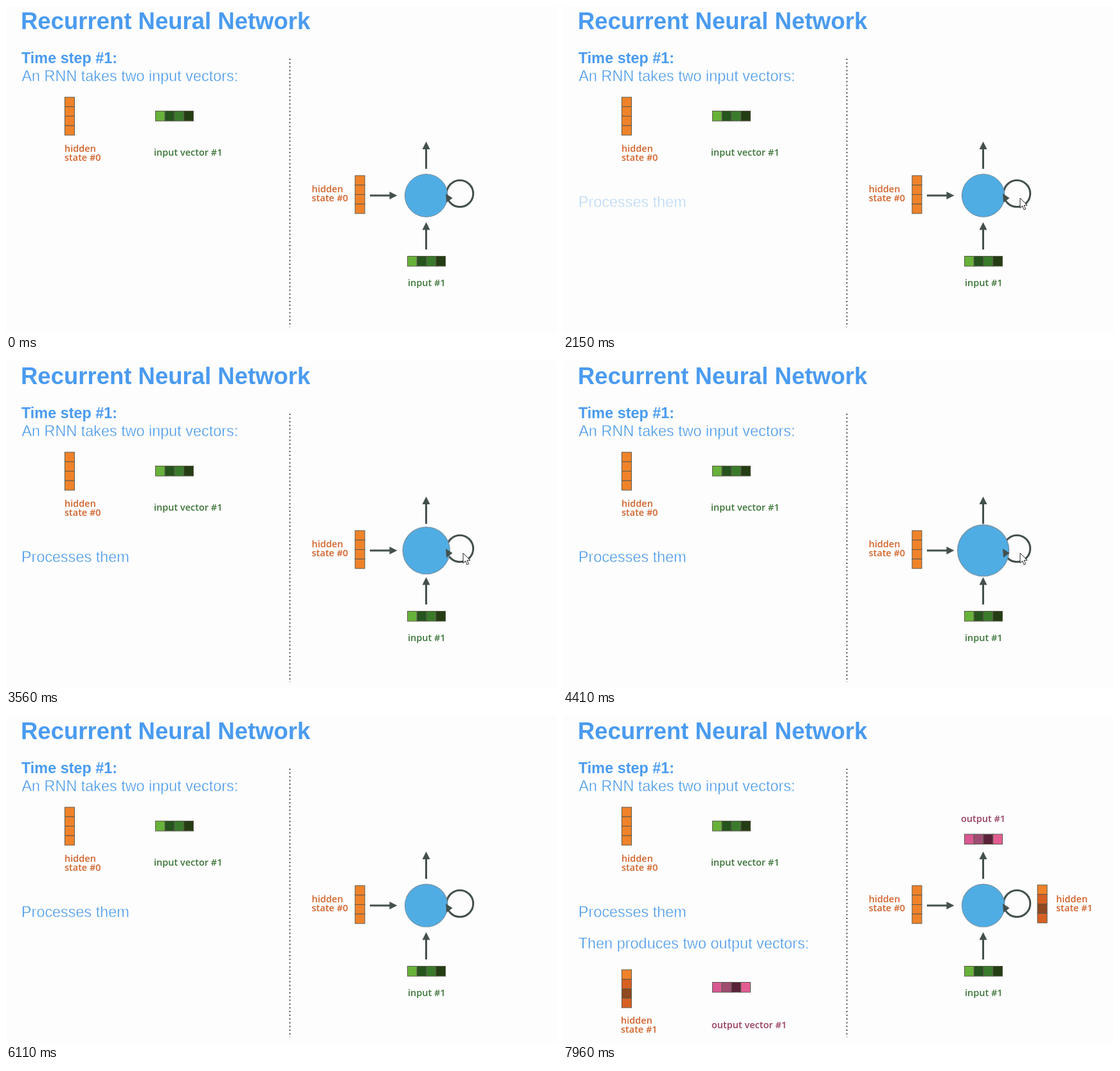
An HTML page that plays this animation: 857x509 px, repeating every 8000 ms.

```html
<!DOCTYPE html>
<html lang="en">
<head>
<meta charset="utf-8">
<title>Recurrent Neural Network</title>
<style>
  html, body { margin: 0; width: 100%; height: 100%; overflow: hidden; background: #fdfdfd; }
  svg { display: block; width: 857px; height: 509px; }
  .title, .step, .line { font-family: "Liberation Sans", Arial, sans-serif; fill: #4a9bf0; }
  .title { font-size: 36.5px; font-weight: 700; }
  .step { font-size: 23.4px; font-weight: 700; }
  /* a background-coloured outline thins the strokes to a light weight */
  .line { font-size: 23.4px; fill: #4396ea; stroke: #fdfdfd; stroke-width: .5px; }
  .label { font: 600 14.5px "Open Sans", "Noto Sans", sans-serif; }
  #ball { transform-box: fill-box; transform-origin: center; }
</style>
</head>
<body>
<svg id="stage" viewBox="0 0 857 509"></svg>
<script>
const LOOP = 8000;
const INK = '#43504d';
const ORANGE = '#d2632b', GREEN = '#3c7538', PLUM = '#98405f';
const HIDDEN_0 = ['#f0832a', '#f0832a', '#f0832a', '#f0832a'];
const HIDDEN_1 = ['#f0832a', '#d85f22', '#8f481f', '#d85f22'];
const INPUT = ['#67b23a', '#25541d', '#3a7b2b', '#243d13'];
const OUTPUT = ['#d95893', '#a04c72', '#5a2139', '#e35d93'];
const CELL = 14.75;

const text = (kind, x, y, words, color) =>
  `<text class="${kind}" x="${x}" y="${y}"${color ? ` style="fill:${color}"` : ''}>${words}</text>`;

const label = (x, y, words, color) => text('label', x, y, words, color);

const stateLabel = (x, y, n) =>
  label(x, y, 'hidden', ORANGE) + label(x, y + 14.3, `state #${n}`, ORANGE);

const vector = (x, y, colors, upright) => colors.map((color, i) => {
  const [dx, dy, w, h] = upright ? [0, i * CELL, 15, CELL] : [i * CELL, 0, CELL, 15.5];
  return `<rect x="${x + dx}" y="${y + dy}" width="${w}" height="${h}" fill="${color}" stroke="#5c5a4c"/>`;
}).join('');

const arrow = (x, y, angle) =>
  `<g transform="translate(${x} ${y}) rotate(${angle})" fill="${INK}">
     <path d="M0 0L-12 -6V6Z"/><rect x="-42.5" y="-1.5" width="32" height="3"/></g>`;

const group = (id, ...parts) => `<g id="${id}">${parts.join('')}</g>`;

document.getElementById('stage').innerHTML = [
  text('title', 23, 36, 'Recurrent Neural Network'),
  text('step', 24, 89, 'Time step #1:'),
  text('line', 24.5, 117, 'An RNN takes two input vectors:'),
  vector(91.5, 142, HIDDEN_0, true),
  stateLabel(91, 227, 0),
  vector(232.5, 163.5, INPUT),
  label(230, 233, 'input vector #1', GREEN),
  '<path d="M441.5 82V500" stroke="#4c4c4c" stroke-width="2" stroke-dasharray="2 3.8"/>',

  group('process', text('line', 24, 313, 'Processes them')),
  group('produce',
    text('line', 24, 362, 'Then produces two output vectors:'),
    vector(91.5, 395, HIDDEN_1, true),
    stateLabel(90, 479, 1),
    vector(232.5, 414.5, OUTPUT),
    label(231, 486, 'output vector #1', PLUM)),

  stateLabel(475.5, 290, 0),
  vector(543, 264, HIDDEN_0, true),
  vector(624.5, 389.5, INPUT),
  label(625, 436, 'input #1', GREEN),
  arrow(608.5, 295, 0),
  arrow(653.5, 211, -90),
  arrow(653.5, 336.5, -90),
  `<circle cx="706" cy="292" r="20.7" fill="none" stroke="${INK}" stroke-width="3"/>`,
  '<circle id="ball" cx="653.7" cy="295" r="33.3" fill="#50ade4" stroke="#6d8798"/>',
  `<path d="M684 292L694.5 299L685 306Z" fill="${INK}"/>`,

  group('result',
    label(619, 165, 'output #1', PLUM),
    vector(624.5, 184, OUTPUT),
    vector(738, 263, HIDDEN_1, true),
    stateLabel(767, 290, 1)),
  `<path id="pointer" d="M0 0V15.5L3.6 12.2L6 18L8.6 16.9L6.1 11.2H11Z"
     fill="#fff" stroke="#222" stroke-linejoin="round"/>`
].join('');

function play(id, steps) {
  const frames = steps.map(([ms, style, easing = 'linear']) => ({ offset: ms / LOOP, easing, ...style }));
  document.getElementById(id).animate(frames, { duration: LOOP, iterations: Infinity });
}

const fadeIn = (id, from, to) => play(id, [
  [0, { opacity: 0 }], [from, { opacity: 0 }], [to, { opacity: 1 }], [LOOP, { opacity: 1 }]
]);

fadeIn('process', 1950, 2500);
fadeIn('produce', 6110, 6750);
fadeIn('result', 7660, 7940);

const scale = k => ({ transform: `scale(${k})` });
play('ball', [
  [0, scale(1)],
  [2730, scale(1), 'ease-in-out'],
  [4410, scale(1.2), 'ease-in-out'],
  [6050, scale(1)],
  [LOOP, scale(1)]
]);

const at = (x, y, opacity) => ({ transform: `translate(${x}px, ${y}px)`, opacity });
play('pointer', [
  [0, at(763, 318, 0), 'step-end'],
  [620, at(763, 318, 1), 'ease-out'],
  [840, at(711, 299, 1)],
  [4880, at(711, 299, 1), 'ease-in'],
  [5100, at(797, 306, 1), 'step-end'],
  [5110, at(797, 306, 0)],
  [LOOP, at(797, 306, 0)]
]);
</script>
</body>
</html>
```
